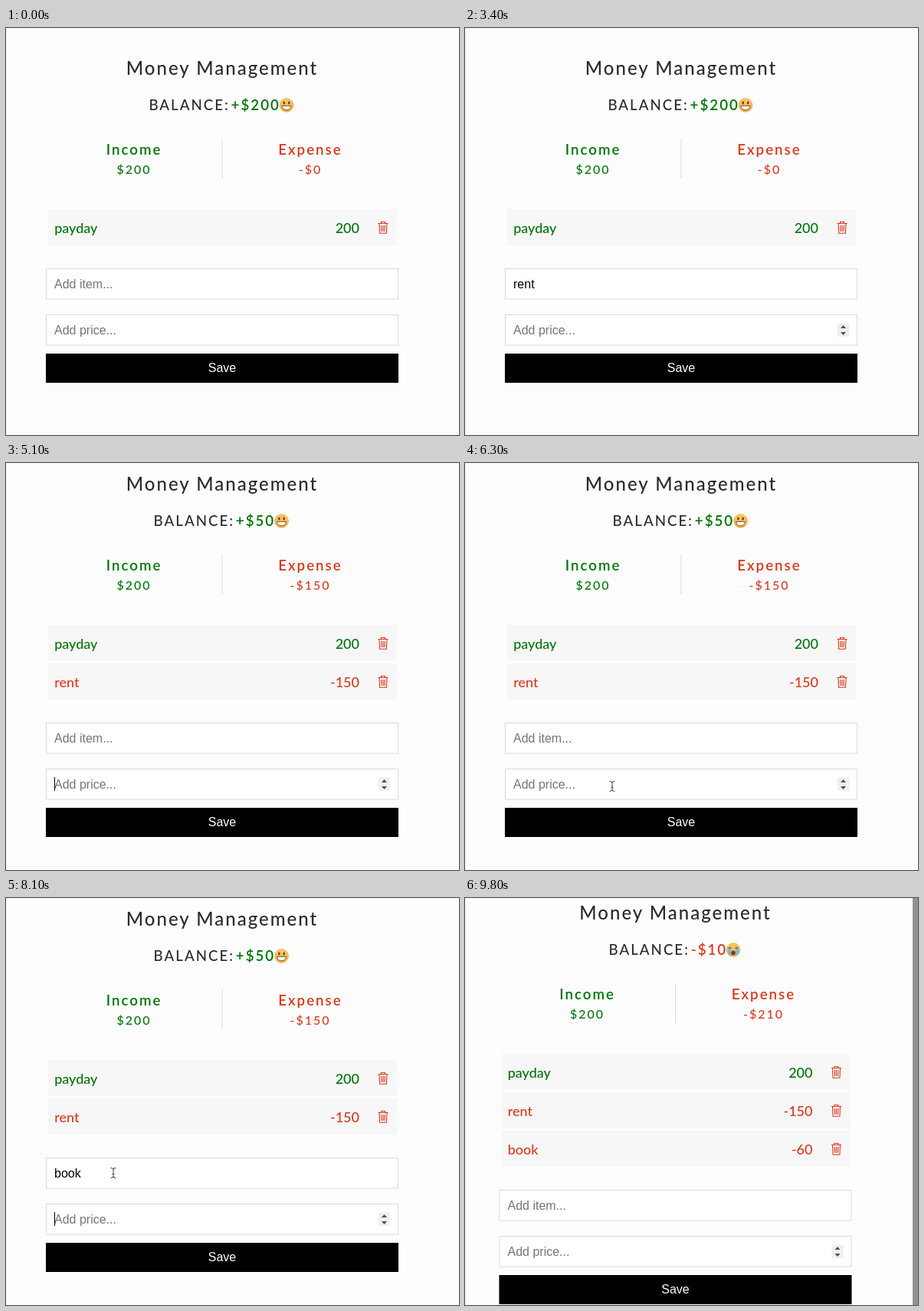
An HTML page that plays this animation: 591x530 px, repeating every 10000 ms.

```html
<!DOCTYPE html>
<html lang="en">
<head>
<meta charset="utf-8">
<title>Money Management</title>
<style>
html, body { margin: 0; width: 100%; height: 100%; overflow: hidden; background: #fdfdfd; }
svg { display: block; font-family: Lato, sans-serif; font-weight: 500; }
.field { font: 16px "Liberation Sans", Arial, sans-serif; }
.spaced { letter-spacing: 2px; }
.strong { font-weight: 600; }
.mid { text-anchor: middle; }
.end { text-anchor: end; }
</style>
</head>
<body>
<svg id="stage" width="591" height="530" viewBox="0 0 591 530"></svg>
<script>
const LOOP = 10000, STEP = 100;
const GREEN = '#007408', RED = '#d9381e', INK = '#2b2b2b';
const stage = document.getElementById('stage');

// When each key goes down, and when the focus moves
const rent = [1900, 2000, 2400, 2700], rentPrice = [4100, 4300, 4500, 4700];
const book = [7500, 7600, 7800, 7900], bookPrice = [8700, 9100, 9300];
const focuses = [[1400, 'item'], [2900, 'price'], [7200, 'item'], [8100, 'price']];
const resets = [...rent, ...rentPrice, ...book, ...bookPrice, ...focuses.map(f => f[0])];

const views = [
  { from: 0, dx: 0, dy: 0, left: 186.4, face: 366, balance: '+$200', expense: '-$0' },
  { from: 5000, dx: 0, dy: -25, left: 192.6, face: 359.5, balance: '+$50', expense: '-$150' },
  { from: 9500, dx: -7.5, dy: -33, left: 195, face: 357.5, balance: '-$10', expense: '-$210' }
];
const items = [['payday', '200'], ['rent', '-150'], ['book', '-60']];

// Mouse moves: start, end, from, to
const moves = [
  [500, 900, [345, 522], [297, 343]],
  [5600, 6300, [297, 343], [192, 421]],
  [6700, 7100, [192, 421], [140, 358]]
];

const typed = (word, keys, t) => word.slice(0, keys.filter(k => k <= t).length);

const text = (x, y, size, fill, str, cls = '') =>
  `<text x="${x}" y="${y}" font-size="${size}" fill="${fill}" class="${cls}">${str}</text>`;

const rect = (x, y, w, h, fill, more = '') =>
  `<rect x="${x}" y="${y}" width="${w}" height="${h}" fill="${fill}" ${more}/>`;

const path = (d, fill, stroke = 'none', more = '') =>
  `<path d="${d}" fill="${fill}" stroke="${stroke}" ${more}/>`;

const at = (x, y, body) => `<g transform="translate(${x} ${y})">${body}</g>`;

function face(x, sad) {
  const head = '<circle r="9.3" fill="#f3b04a"/><circle r="8" cy="-1" fill="#f8c262"/>';
  const happy = '<ellipse cx="-3.2" cy="-3" rx="1.3" ry="2" fill="#6b431c"/>' +
    '<ellipse cx="3.2" cy="-3" rx="1.3" ry="2" fill="#6b431c"/>' +
    path('M-6 .8H6C6 8.2-6 8.2-6 .8Z', '#fff', '#7a4a20');
  const crying = path('M-6.5-2.5h4M2.5-2.5h4', 'none', '#6b431c', 'stroke-width="1.3"') +
    path('M-7-2h4v9.5q-3-1-4-4zM7-2h-4v9.5q3-1 4-4z', '#69bfe0') +
    '<ellipse cy="4" rx="2.8" ry="3" fill="#6b431c"/>';
  return at(x, 100.5, head + (sad ? crying : happy));
}

const trash = (x, y) => at(x, y, path(
  'M-6.5-5.5H6.5M-2.5-5.5V-7.5H2.5V-5.5M-5-5.5L-4.4 7.3H4.4L5-5.5M-2.3-3L-2 5M0-3V5M2.3-3L2 5',
  'none', RED, 'stroke-width="1.1"'));

function row([name, price], i) {
  const y = 236 + 50 * i, color = price[0] === '-' ? RED : GREEN;
  return rect(55, y, 455, 47, '#f7f7f7') + text(63.2, y + 30.5, 18, color, name) +
    text(461, y + 30.5, 18, color, price, 'end') + trash(492, y + 24);
}

function field(y, value, hint, focused) {
  return rect(52.5, y + .5, 459, 39.5, '#fff', 'stroke="#dadada"') +
    `<text x="63" y="${y + 26}" class="field" fill="${value ? '#000' : '#757575'}"` +
    `${focused ? ' id="active"' : ''}>${value || hint}</text>`;
}

const spinner = y => rect(486, y + 11.5, 15, 17.5, '#efefef', 'rx="1"') +
  path(`M490 ${y + 18}l3.5-4 3.5 4zM490 ${y + 23}l3.5 4 3.5-4z`, '#505050');

function pointer(t, view) {
  if (!(t >= 500 && t < 2400 || t >= 5600 && t < 8700)) return '';
  const [start, end, a, b] = moves.filter(m => m[0] <= t).pop();
  const k = Math.min(1, (t - start) / (end - start)), e = k * k * (3 - 2 * k);
  const [x, y] = a.map((v, i) => v + (b[i] - v) * e);
  const top = 313 + view.dy + 50 * views.indexOf(view);
  const inField = y > top && y < top + 40 || y > top + 60 && y < top + 100;
  const beam = 'M-3.5-6.5Q0-6.5 0-4.5Q0-6.5 3.5-6.5M0-5V5M-3.5 6.5Q0 6.5 0 4.5Q0 6.5 3.5 6.5M-1.5 1.5H1.5';
  return at(x, y, inField
    ? path(beam, 'none', '#fff', 'stroke-width="2.4"') + path(beam, 'none', '#444')
    : path('M0 0V15L3.5 11.8 6 17 8.4 16 6 10.8H10.8Z', '#000', '#fff'));
}

function draw(t) {
  const n = views.filter(v => v.from <= t).length, view = views[n - 1];
  const focus = (focuses.filter(f => f[0] <= t).pop() || [0, ''])[1];
  const item = ['', typed('rent', rent, t), typed('book', book, t), ''][n];
  const price = ['', typed('-150', rentPrice, t), typed('-60', bookPrice, t), ''][n];
  const sad = view.balance[0] === '-', base = 263 + 50 * n;

  const page =
    text(282, 61.3, 24, INK, 'Money Management', 'mid spaced') +
    text(view.left, 107, 18.72, INK, 'BALANCE:', 'spaced') +
    text(view.left + 107.2, 107, 18.72, sad ? RED : GREEN, view.balance, 'spaced strong') +
    face(view.face, sad) +
    text(167, 165.3, 18.72, GREEN, 'Income', 'mid spaced strong') +
    text(167, 190, 16, GREEN, '$200', 'mid spaced') +
    text(397, 165.3, 18.72, RED, 'Expense', 'mid spaced strong') +
    text(397, 190, 16, RED, view.expense, 'mid spaced') +
    rect(281.5, 144, 1, 52, '#dcdcdc') +
    items.slice(0, n).map(row).join('') +
    field(base, item, 'Add item...', focus === 'item') +
    field(base + 60, price, 'Add price...', focus === 'price') +
    (focus === 'price' ? spinner(base + 60) : '') +
    rect(52, base + 111, 460, 38, '#000') +
    `<text x="282" y="${base + 135}" class="field mid" fill="#fff">Save</text>` +
    '<g id="caret"></g>';

  stage.innerHTML = rect(0, 0, 591, 530, '#fdfdfd') +
    rect(0, 0, 591, 1, '#f3f3f3') + rect(0, 0, 1, 530, '#ececec') +
    at(view.dx, view.dy, page) +
    (n === 3 ? rect(584, 0, 7, 530, '#929292') : '') + pointer(t, view);

  const last = Math.max(...resets.filter(r => r <= t));
  if (focus && (t - last) % 1000 < 500) {
    const value = focus === 'item' ? item : price;
    const width = value ? document.getElementById('active').getComputedTextLength() : 0;
    const y = base + (focus === 'item' ? 11 : 71);
    document.getElementById('caret').innerHTML = rect(63 + Math.round(width), y, 1, 18, '#000');
  }
}

let shown = -1;
function tick() {
  const t = Math.floor(performance.now() % LOOP / STEP) * STEP;
  if (t !== shown) draw(shown = t);
  requestAnimationFrame(tick);
}
tick();
</script>
</body>
</html>
```
